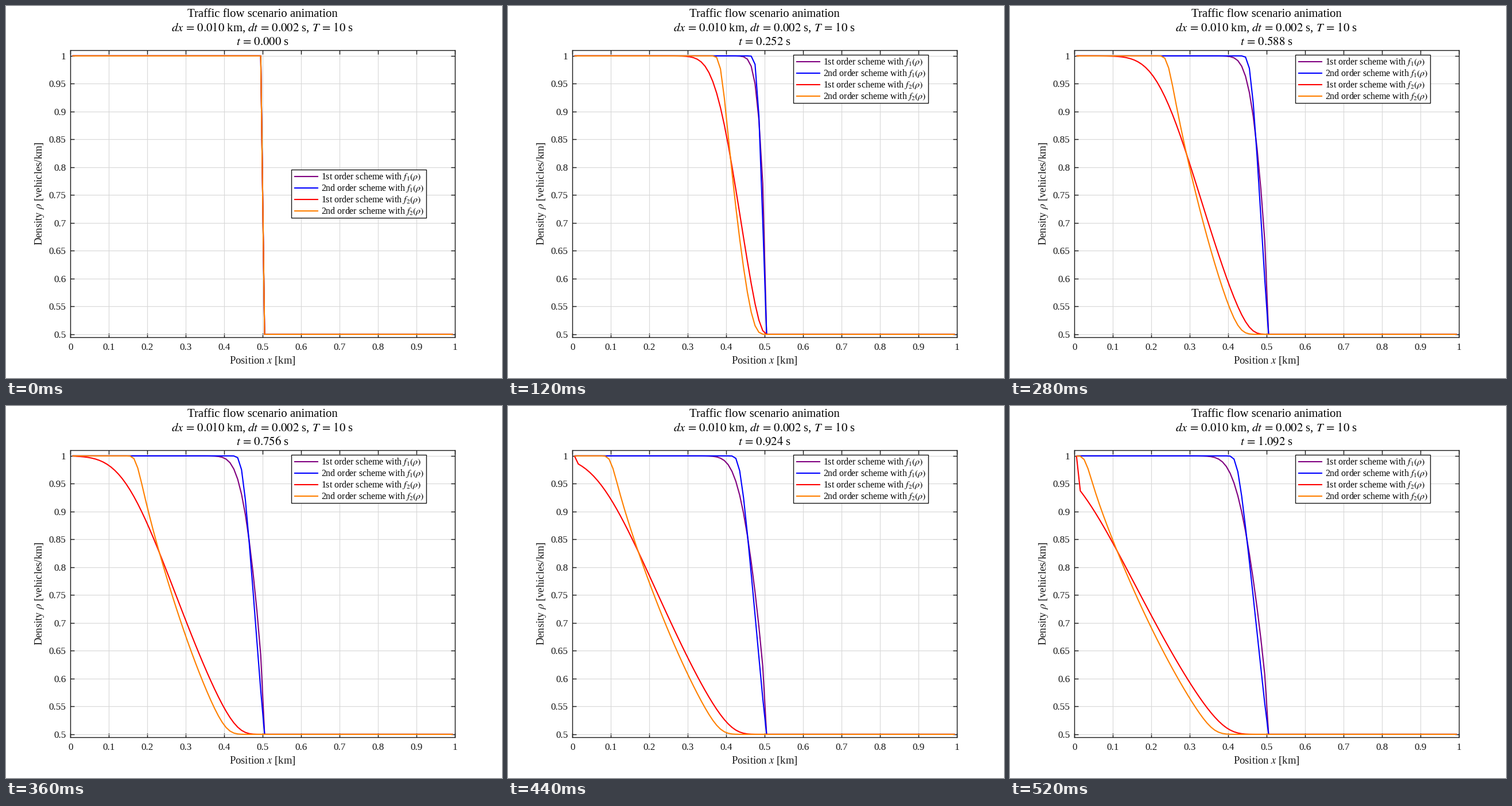
Recreate the animation shown at these times as a matplotlib script. Size 864x648 px, loop 560 ms.

```python
import numpy as np
import matplotlib.pyplot as plt
from matplotlib.animation import FuncAnimation
from matplotlib.patches import Rectangle

plt.rcParams.update({"font.family": "Liberation Serif", "mathtext.fontset": "stix"})

W, H, DPI = 864, 648, 72          # one point equals one pixel
FRAMES, STEPS, DT, DX = 14, 42, 0.002, 0.01
INK = "#151515"
COLORS = ["#800080", "#0000ff", "#ff0000", "#ff8000"]
x = np.arange(DX / 2, 1, DX)


def f1(r):
    return 0.0667 * r * (1 - r)


def f2(r):
    return -0.435 * r * np.log(r)


def limited_slope(r):
    """Van Leer (harmonic) slope per cell, zero at both ends."""
    d = np.diff(r)
    a, b = d[:-1], d[1:]
    same = a * b > 0
    s = np.zeros_like(r)
    s[1:-1] = np.where(same, 2 * a * b / np.where(same, a + b, 1), 0)
    return s


def solve(flux, order):
    """Upwind scheme for left-going waves, sampled once per frame."""
    r = np.where(x < 0.5, 1.0, 0.5)
    out = [r.copy()]
    for _ in range(FRAMES - 1):
        for _ in range(STEPS):
            face = r - 0.5 * limited_slope(r) if order == 2 else r
            f = flux(face)
            r[1:-1] -= DT / DX * (f[2:] - f[1:-1])
        out.append(r.copy())
    return out


runs = [solve(f, order) for f in (f1, f2) for order in (1, 2)]

fig = plt.figure(figsize=(W / DPI, H / DPI), dpi=DPI, facecolor="white")


def label(px, py, text, size, ha="center", **kw):
    """Text with its baseline at a pixel position measured from the top left."""
    return fig.text(px / W, 1 - py / H, text, fontsize=size, ha=ha,
                    va="baseline", color=kw.pop("color", INK), **kw)


# Plot area
LEFT, RIGHT, TOP, BOTTOM = 112.4, 781.8, 77.2, 576.8
Y_MIN, Y_MAX = 0.495, 1.01
ax = fig.add_axes([LEFT / W, 1 - BOTTOM / H, (RIGHT - LEFT) / W, (BOTTOM - TOP) / H])
ax.set(xlim=(0, 1), ylim=(Y_MIN, Y_MAX))
ax.set_xticks(np.arange(11) / 10)
ax.set_yticks(np.arange(10, 21) / 20)
ax.set_axisbelow(True)
ax.grid(color="#d9d9d9", linewidth=1.2)
ax.tick_params(direction="in", length=6.7, width=1.4, color=INK, top=True, right=True,
               labelbottom=False, labelleft=False)
for spine in ax.spines.values():
    spine.set(linewidth=1.4, edgecolor=INK)

for v in ax.get_xticks():
    label(LEFT + v * (RIGHT - LEFT), 599.3, f"{v:g}", 17.3)
for v in ax.get_yticks():
    py = BOTTOM - (v - Y_MIN) / (Y_MAX - Y_MIN) * (BOTTOM - TOP)
    label(104.5, py + 5.8, f"{v:g}", 17.3, ha="right")

label(447, 623, r"Position $x$ [km]", 18.6)
label(63, 327, r"Density $\rho$ [vehicles/km]", 18.7, rotation=90, rotation_mode="anchor")
label(447, 19.2, "Traffic flow scenario animation", 20.7, color="black")
label(447, 43.6, r"$dx\,=\,0.010$ km, $dt\,=\,0.002$ s, $T\,=\,10$ s", 20.7, color="black")
clock = label(447, 68.3, "", 20.7, color="black")

curves = [ax.plot(x, run[0], color=c, linewidth=2.1, solid_joinstyle="round",
                  solid_capstyle="butt")[0] for run, c in zip(runs, COLORS)]

# Legend on its own layer in pixel units
LEG_X, LEG_W, LEG_H, LEG_ROW = 496.8, 235, 84, 20
leg = fig.add_axes([0, 0, 1, 1], zorder=5)
leg.set(xlim=(0, W), ylim=(H, 0))
leg.axis("off")
box = leg.add_patch(Rectangle((LEG_X, 0), LEG_W, LEG_H, facecolor="white",
                              edgecolor=INK, linewidth=1.4))
entries = []
for i, c in enumerate(COLORS):
    key, = leg.plot([501.5, 544], [0, 0], color=c, linewidth=2.1, solid_capstyle="butt")
    name = f"{('1st', '2nd')[i % 2]} order scheme with $f_{i // 2 + 1}(\\rho)$"
    text = leg.text(548.8, 0, name, fontsize=15.9, va="baseline", color="black")
    entries.append((key, text))


def place_legend(top):
    box.set_y(top)
    for i, (key, text) in enumerate(entries):
        py = top + 12 + i * LEG_ROW
        key.set_ydata([py, py])
        text.set_y(py + 5)


def draw(n):
    for curve, run in zip(curves, runs):
        curve.set_ydata(run[n])
    clock.set_text(rf"$t\,=\,{n * STEPS * DT:.3f}$ s")
    place_legend(285 if n == 0 else 85)
    return [*curves, clock]


anim = FuncAnimation(fig, draw, frames=FRAMES, interval=40, repeat=True,
                     repeat_delay=0, blit=False)
plt.show()
```
